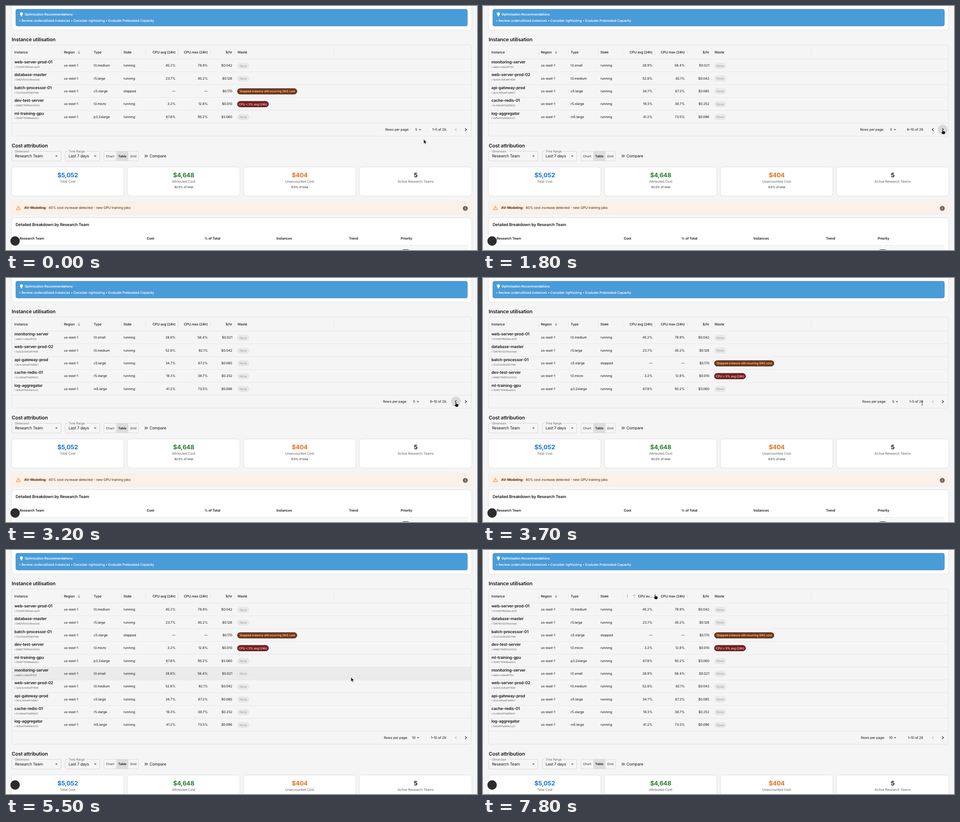
An HTML page that plays this animation: 1037 by 540 pixels, repeating every 8 s.

```html
<!DOCTYPE html>
<html lang="en">
<head>
<meta charset="utf-8">
<title>Instance utilisation</title>
<style>
html, body { margin: 0; width: 100%; height: 100%; overflow: hidden; background: #f5f5f5; }
svg { display: block; width: 100%; height: 100%; }
text { font-family: Inter, Roboto, sans-serif; letter-spacing: -.02em; text-rendering: geometricPrecision; }
.card { fill: #fff; filter: drop-shadow(0 .8px 1.2px rgba(0, 0, 0, .2)); }
.menu { fill: #fff; filter: drop-shadow(0 2px 3px rgba(0, 0, 0, .28)); }
</style>
</head>
<body>
<svg id="stage" viewBox="0 0 1037 540"></svg>
<script>
const LOOP = 8000, STEP = 100;
const ROW = 28.35, TOP = 117.3;
const INK = '#1a1a1a', GREY = '#666', LINE = '#e0e0e0', PAGE = '#f5f5f5';
const STOPPED = 'Stopped instance still incurring DKS cost';

// name | id | type | state | average | maximum | price | waste key
const instances = `web-server-prod-01|i-1234567890abcdef0|t3.medium|running|45.2%|78.9%|$0.042
database-master|i-0987654321fedcba0|r5.large|running|23.7%|45.2%|$0.126
batch-processor-01|i-1122334455667788|c5.xlarge|stopped|—|—|$0.170|stopped
dev-test-server|i-9988776655443322|t3.micro|running|3.2%|12.8%|$0.010|cpu
ml-training-gpu|i-5566778899aabbcc|p3.2xlarge|running|67.8%|95.2%|$3.060
monitoring-server|i-aabbccddeeff1122|t3.small|running|28.9%|56.4%|$0.021
web-server-prod-02|i-1a2b3c4d5e6f7890|t3.medium|running|52.8%|82.1%|$0.042
api-gateway-prod|i-2b3c4d5e6f7a8901|c5.large|running|34.7%|67.2%|$0.085
cache-redis-01|i-3c4d5e6f7a890b12|r5.xlarge|running|18.3%|38.7%|$0.252
log-aggregator|i-4d5e6f7a890b1c23|m5.large|running|41.2%|73.5%|$0.096
staging-web-01|i-5e6f7a890b1c2d34|t3.small|running|12.4%|28.9%|$0.021|staging
data-warehouse|i-6f7a890b1c2d3e45|r5.4xlarge|running|56.8%|89.3%|$1.008
backup-server|i-7a890b1c2d3e4f56|t3.medium|stopped|—|—|$0.042|stopped
ml-inference-01|i-890b1c2d3e4f5a67|p2.xlarge|running|45.7%|76.3%|$0.900|gpu
dev-backend-01|i-90b1c2d3e4f5a678|t3.micro|running|8.7%|22.1%|$0.010`
  .split('\n').map(line => line.split('|'));

// Chip looks: label, width, fill, border, text colour
const BROWN = ['#753611', '#45200a', '#fff'], RED = ['#791e1e', '#470f0f', '#fff'];
const NAVY = ['#1e293b', '#0f172a', '#fff'], PALE = ['#e8e8e8', '#e8e8e8', '#9c9c9c'];
const wastes = {
  none: ['None', 26, ...PALE],
  stopped: [STOPPED, 131.5, ...BROWN],
  cpu: ['CPU &lt; 5% avg (24h)', 69, ...RED],
  staging: ['Low utilization in staging', 84.5, ...NAVY],
  gpu: ['GPU underutilized', 64, ...BROWN],
};

// Table views: start time, first row, row count, range, label end, value x, arrow x
const views = [
  [0, 0, 5, '1–5 of 28', 888, 901, 911.5],
  [1300, 5, 5, '6–10 of 28', 883.3, 896.3, 906.8],
  [2200, 10, 5, '11–15 of 28', 882.3, 895.3, 905.8],
  [3000, 5, 5, '6–10 of 28', 883.3, 896.3, 906.8],
  [3600, 0, 5, '1–5 of 28', 888, 901, 911.5],
  [5200, 0, 10, '1–10 of 28', 885, 894, 907.3],
];

// Pointer path: time, x, y, shape
const path = [
  [0, 919.5, 295, 'arrow'], [200, 923, 299, 'arrow'], [400, 952, 297, 'arrow'],
  [600, 1002, 277, 'hand'], [700, 1012, 273.5, 'hand'], [2500, 1012, 273.5, 'hand'],
  [2600, 1001.5, 276.5, 'hand'], [2800, 990.5, 275, 'hand'], [3500, 990.5, 275, 'hand'],
  [3700, 967, 277, 'beam'], [3800, 930, 276.5, 'arrow'], [3900, 904, 276, 'hand'],
  [4400, 904, 276, 'hand'], [4900, 901.5, 318.5, 'hand'], [5200, 901.5, 318.5, 'arrow'],
  [5700, 665, 257, 'arrow'], [6000, 665, 257, 'arrow'], [6400, 308.5, 180.5, 'arrow'],
  [6500, 308.5, 180.5, 'arrow'], [6700, 282, 149, 'arrow'], [6900, 267.5, 128, 'arrow'],
  [7200, 290, 121, 'arrow'], [7400, 322, 114, 'hand'], [7800, 379, 98.8, 'hand'],
  [LOOP, 379, 98.8, 'hand'],
];

const clamp = v => Math.max(0, Math.min(1, v));
const ramp = (t, from, to) => clamp((t - from) / (to - from));

const text = (s, x, y, size = 7.4, { w = 400, c = INK, a = 'start' } = {}) =>
  `<text x="${x}" y="${y}" font-size="${size}" font-weight="${w}" fill="${c}" text-anchor="${a}">${s}</text>`;
const rect = (x, y, w, h, r, fill, extra = '') =>
  `<rect x="${x}" y="${y}" width="${w}" height="${h}" rx="${r}" fill="${fill}" ${extra}/>`;
const frame = (x, y, w, h, r, c = '#c6c6c6') => rect(x, y, w, h, r, 'none', `stroke="${c}" stroke-width=".7"`);
const card = (x, y, w, h, r = 6) => rect(x, y, w, h, r, '#fff', 'class="card"');
const line = (d, c = LINE, w = .7, extra = '') => `<path d="${d}" fill="none" stroke="${c}" stroke-width="${w}" ${extra}/>`;
const disc = (x, y, r, fill, extra = '') => `<circle cx="${x}" cy="${y}" r="${r}" fill="${fill}" ${extra}/>`;
const group = (x, y, body) => `<g transform="translate(${x} ${y})">${body}</g>`;
const caret = (x, y, up) => `<path d="M${x - 2.8} ${y + (up ? 1.3 : -1.3)}h5.6l-2.8 ${up ? -2.8 : 2.8}z" fill="#666"/>`;
const sortArrow = (x, y, dir, c) =>
  line(`M${x} ${y - 3.3 * dir}V${y + 3.3 * dir}M${x - 3.1} ${y + .3 * dir}L${x} ${y + 3.3 * dir}L${x + 3.1} ${y + .3 * dir}`, c, .9);
const chevron = (x, y, dir, c) => line(`M${x - 1.5 * dir} ${y - 3.1}l${3.1 * dir} 3.1l${-3.1 * dir} 3.1`, c, 1.2);

const pointers = {
  arrow: '<path d="M0 0V9.6L2.2 7.6L3.7 11L5.4 10.3L3.9 7H6.8Z" fill="#111" stroke="#fff" stroke-width=".6"/>',
  hand: '<path d="M-1 .2Q0-1.5 1 .2V3.5Q4 3.2 5.7 4.6V7L4.7 10.2H-.2L-3.4 6Q-3.2 4.5-1 5.8Z" fill="#111" stroke="#fff" stroke-width=".5"/>',
  beam: line('M-1.8-4Q0-4 0-3Q0-4 1.8-4M0-3V3M-1.8 4Q0 4 0 3Q0 4 1.8 4', '#333', .8),
};

function pointerAt(t) {
  const i = path.findIndex(([end]) => end > t);
  const [t0, x0, y0, shape] = path[i - 1], [t1, x1, y1] = path[i];
  const k = ramp(t, t0, t1);
  return { x: x0 + (x1 - x0) * k, y: y0 + (y1 - y0) * k, shape };
}

function banner() {
  return card(12.5, -20, 1012.5, 73) +
    rect(21.5, 7, 994.5, 37.5, 4, '#4a9cd8', 'stroke="#3585c4" stroke-width=".54"') +
    disc(34, 17.3, 3.2, '#fff') + rect(32.3, 18.5, 3.4, 3, .5, '#fff') + rect(32.3, 22.1, 3.4, 1, .4, '#fff') +
    text('Optimization Recommendations:', 41, 21, 7.1, { w: 600, c: '#fff' }) +
    text('• Review underutilized instances • Consider rightsizing • Evaluate Prebooked Capacity', 28.5, 34.8, 7.5, { c: '#fff', w: 500 });
}

function header(hovered) {
  const bold = { w: 500 }, right = { w: 500, a: 'end' };
  const separators = [122.5, 188, 253.5, 307.5, 378.5, 449.5, 504, 722].map(x => `M${x} 94.5v14.5`).join('');
  const average = hovered
    ? [-2.4, 0, 2.4].map(d => disc(318, 102 + d, .75, GREY)).join('') +
      sortArrow(333, 102, -1, '#aaa') + text('CPU av...', 373, 104.7, 7.5, right)
    : text('CPU avg (24h)', 373, 104.7, 7.5, right);
  return line(separators) + text('Instance', 18.5, 104.7, 7.5, bold) + text('Region', 127.5, 104.7, 7.5, bold) +
    sortArrow(160.8, 102, 1, '#777') + text('Type', 193, 104.7, 7.5, bold) + text('State', 258.5, 104.7, 7.5, bold) +
    average + text('CPU max (24h)', 444, 104.7, 7.5, right) + text('$/hr', 498, 104.7, 7.5, right) +
    text('Waste', 509.5, 104.7, 7.5, bold);
}

function instanceRow([name, id, type, state, average, maximum, price, waste = 'none'], y, hovered) {
  const base = y + 16.9, right = { a: 'end' };
  const [label, width, fill, border, color] = wastes[waste];
  return (hovered ? rect(12.5, y, 1012, ROW, 0, '#ebebeb') : '') +
    line(`M12.5 ${y + ROW}H1024.5`) +
    text(name, 18.5, y + 9.8, 8.85, { w: 600 }) + text(id, 18.5, y + 19.6, 5.5, { c: GREY }) +
    text('us-east-1', 127.5, base) + text(type, 193, base) + text(state, 258.5, base) +
    text(average, 373, base, 7.4, right) + text(maximum, 444, base, 7.4, right) + text(price, 498, base, 7.4, right) +
    rect(509.3, y + 8.5, width, 12.8, 6.4, fill, `stroke="${border}" stroke-width=".54"`) +
    text(label, 509.3 + width / 2, y + 17.3, 6.65, { c: color, a: 'middle' });
}

function pagination(t, [, first, count, range, labelEnd, valueX, arrowX], dy) {
  const y = 273.4 + dy, base = y + 2.7;
  const glow = (x, alpha) => disc(x, 273.3, 10.8, '#000', `opacity="${alpha}"`);
  const next = t >= 700 && t < 2800 ? (t >= 1200 && t < 2500 ? .11 : .045) : 0;
  const prev = t >= 2800 && t < 3600 ? (t >= 3000 ? .11 : .045) : 0;
  return text('Rows per page:', labelEnd, base, 7.5, { a: 'end' }) + text(count, valueX, base, 7.5) +
    caret(arrowX, y + .5, t >= 4200 && t < 5200) + text(range, 969, base, 7.5, { a: 'end' }) +
    (next ? glow(1012.3, next) : '') + (prev ? glow(990.5, prev) : '') +
    chevron(990.5, y, -1, first ? INK : '#bcbcbc') + chevron(1012.3, y, 1, INK);
}

function selectBox(x, width, label, labelWidth, value) {
  return frame(x, 321.5, width, 21.4, 2.5) + rect(x + 5.5, 320.5, labelWidth + 4, 2, 0, PAGE) +
    text(label, x + 7.5, 323.8, 6.5, { c: GREY }) + text(value, x + 7.2, 335.2, 8.75) + caret(x + width - 10, 332.4);
}

function costs() {
  const mid = { a: 'middle' };
  const toggles = [['Chart', 229.2, GREY], ['Table', 256, INK], ['Grid', 280.3, GREY]];
  const totals = [['$5,052', 'Total Cost', '', '#1976d2'], ['$4,648', 'Attributed Cost', '92.0% of total', '#2e7d32'],
    ['$404', 'Unaccounted Cost', '8.0% of total', '#e8701e'], ['5', 'Active Research Teams', '', INK]];
  const columns = [['Research Team', 30], ['Cost', 310], ['% of Total', 436.7], ['Instances', 595.5], ['Trend', 755], ['Priority', 869]];
  return text('Cost attribution', 12.5, 312.8, 11.05, { w: 600 }) +
    selectBox(12.5, 108.5, 'Dimension', 32, 'Research Team') + selectBox(130.5, 76, 'Time Range', 36, 'Last 7 days') +
    rect(243.5, 321.5, 25.3, 21, 0, '#dedede') + frame(215.5, 321.5, 76, 21, 2.5, '#d0d0d0') +
    line('M243.5 321.5v21M268.8 321.5v21', '#d0d0d0') +
    toggles.map(([s, x, c]) => text(s, x, 334.5, 7.1, { ...mid, c, w: 600 })).join('') +
    rect(299, 329.2, 13.5, 5.6, 2.8, '#9b9b9b') + disc(301.3, 332, 4.3, '#fff', 'class="card"') +
    text('Compare', 316, 335.2, 8.75) +
    totals.map(([value, label, share, c], i) => {
      const x = 12.5 + 255.4 * i, cx = x + 123.3;
      return card(x, 356.7, 246.6, 63.2) + text(value, cx, 378.8, 13.4, { ...mid, c, w: 700 }) +
        text(label, cx, 391.2, 7.5, { ...mid, c: GREY }) + text(share, cx, 403.2, 6.45, mid);
    }).join('') +
    rect(12.5, 432.8, 1012.5, 27.6, 4, '#fbf1e8', 'style="filter:drop-shadow(0 .5px .7px #0002)"') +
    line('M27.2 442.6L32 451H22.4Z', '#ed7a22', 1, 'stroke-linejoin="round"') + line('M27.2 445.6v2.5M27.2 448.9v1', '#ed7a22', .9) +
    text('AV-Modeling:', 40, 449.4, 7.6, { w: 700, c: '#5f2b01' }) +
    text('40% cost increase detected - new GPU training jobs', 93.5, 449.4, 7.6, { c: '#5f2b01' }) +
    disc(1011.2, 447.9, 5.4, '#666') + line('M1011.2 447.2v3.4M1011.2 445v1.2', '#fff', 1.1) +
    card(12.5, 469.2, 1012.5, 90) + text('Detailed Breakdown by Research Team', 21.3, 486.7, 8.95, { w: 600 }) +
    columns.map(([s, x]) => text(s, x, 517.2, 7.5, { w: 600 })).join('') +
    rect(21.3, 529.8, 995, 20, 0, '#f7f7f7') + line('M21.3 529.8H1016') + rect(870, 538.8, 20, 12, 6, '#444');
}

function menu(t) {
  const alpha = Math.min(ramp(t, 4100, 4400), 1 - ramp(t, 5200, 5400));
  if (!alpha) return '';
  const hover = t >= 4800 ? rect(891.5, 305.6, 28.5, 19.5, 0, '#d0d0d0') : '';
  const ripple = t >= 5000 ? disc(901.5, 321, 9 + 10 * ramp(t, 5000, 5100), '#b3b3b3', 'clip-path="url(#option)"') : '';
  return `<g opacity="${alpha}"><clipPath id="option">${rect(891.5, 305.6, 28.5, 19.5, 0, '#000')}</clipPath>` +
    rect(891.5, 282, 28.5, 67, 2.5, '#fff', 'class="menu"') + rect(891.5, 286, 28.5, 19.5, 0, '#edf2f9') + hover + ripple +
    [5, 10, 25].map((n, i) => text(n, 900, 298.7 + 19.6 * i, 8.7)).join('') + '</g>';
}

function draw(t) {
  const pointer = pointerAt(t);
  const view = views.filter(([start]) => start <= t).pop();
  const [, first, count] = view;
  const dy = (count - 5) * ROW;
  const rows = instances.slice(first, first + count).map((data, i) => {
    const y = TOP + ROW * i;
    return instanceRow(data, y, pointer.y >= y && pointer.y < y + ROW);
  }).join('');
  return rect(0, 0, 1037, 540, 0, PAGE) + banner() +
    text('Instance utilisation', 12.5, 77.7, 11.05, { w: 600 }) +
    rows + frame(12.5, 86.5, 1012, 201.5 + dy, 4, '#dcdcdc') + line(`M12.5 ${TOP}H1024.5`) +
    header(pointer.y < TOP) + pagination(t, view, dy) + group(0, dy, costs()) + menu(t) +
    disc(20, 520, 10.4, '#2c2c2c') + group(pointer.x, pointer.y, pointers[pointer.shape]);
}

const stage = document.getElementById('stage');
let shown = -1;
function tick() {
  const t = Math.floor(performance.now() % LOOP / STEP) * STEP;
  if (t !== shown) stage.innerHTML = draw(shown = t);
  requestAnimationFrame(tick);
}
tick();
</script>
</body>
</html>
```
